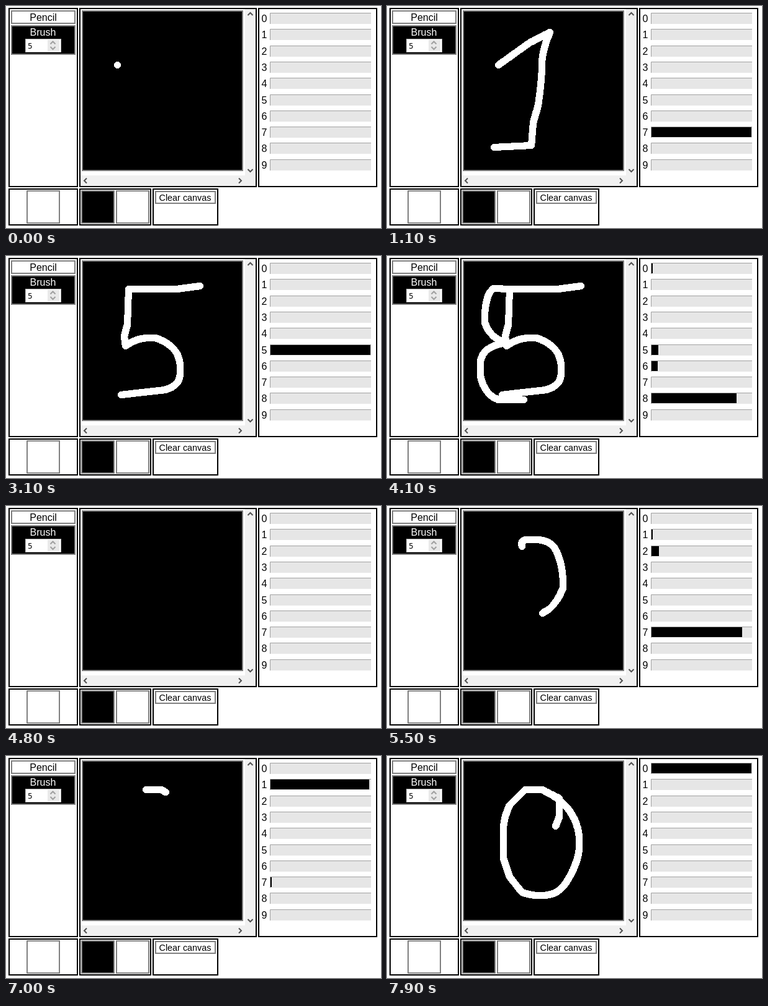
Recreate the animation shown at these times as an HTML page with a canvas. Size 604x359 px, loop 8 s.

```html
<!DOCTYPE html>
<html lang="en">
<head>
<meta charset="utf-8">
<title>Digit recognition</title>
<style>
  html, body { margin: 0; width: 604px; height: 359px; overflow: hidden; background: #fff; }
  body { position: relative; }
  svg, canvas { position: absolute; display: block; }
  svg { left: 0; top: 0; font: 16px "Liberation Sans", Arial, sans-serif; }
  canvas { left: 124px; top: 9px; background: #000; }
  .panel { fill: #fff; stroke: #000; stroke-width: 2; }
  .box { fill: #fff; stroke: #808080; stroke-width: 2; }
  .box.on { fill: #000; }
  .mid { text-anchor: middle; }
  .track { fill: #f0f0f0; }
  .arrow { fill: none; stroke: #505050; stroke-width: 2; }
  .spin { fill: none; stroke: #a0a0a0; stroke-width: 2; }
</style>
</head>
<body>
<svg width="604" height="359">
  <g class="panel">
    <rect x="5" y="4" width="110" height="288"/>
    <rect x="119" y="4" width="284" height="288"/>
    <rect x="407" y="4" width="190" height="288"/>
    <rect x="5" y="296" width="110" height="58"/>
    <rect x="119" y="296" width="114" height="58"/>
    <rect x="237" y="296" width="104" height="58"/>
  </g>

  <rect class="box" x="9" y="8" width="102" height="20"/>
  <text class="mid" x="60" y="24">Pencil</text>
  <rect class="box on" x="9" y="32" width="102" height="46"/>
  <text class="mid" x="59.5" y="48" fill="#fff">Brush</text>
  <rect x="31.5" y="53.5" width="57" height="21" fill="#fff" stroke="#bbb"/>
  <text x="35" y="69" style="font:12px 'DejaVu Sans', sans-serif">5</text>
  <rect x="67" y="55" width="19" height="18" fill="#e9e9e9"/>
  <path class="spin" d="M71.5 61.5l4-4 4 4M71.5 66l4 4 4-4"/>

  <rect class="box on" x="123" y="8" width="258" height="258"/>
  <rect class="track" x="385" y="5" width="17" height="286"/>
  <rect class="track" x="120" y="274" width="282" height="17"/>
  <path class="arrow" d="M389.5 15l4-4 4 4M389.5 264l4 4 4-4M130 278.500l-4 4 4 4M375 278.500l4 4-4 4"/>

  <rect class="box" x="34" y="299" width="52" height="52"/>
  <rect class="box on" x="122" y="299" width="52" height="52"/>
  <rect class="box" x="178" y="299" width="52" height="52"/>
  <rect class="box" x="241" y="300" width="96" height="19"/>
  <text class="mid" x="288.5" y="315" font-size="14.4">Clear canvas</text>
  <g id="meters"></g>
</svg>
<canvas id="pad" width="256" height="256"></canvas>

<script>
const LOOP = 8000, STEP = 100, FULL = 161;

// Per digit: the time of the wipe, pen strokes, and the odds the recogniser reaches.
const digits = [
  { wipe: 1800,
    strokes: [
      { start: 0, end: 800, d: "M179 95L229 59L262 42Q249 72 249 95T243 160L235 188L232 225L172 228" },
      { start: 1100, end: 1400, d: "M232 225L292 223" }],
    reads: [{ at: 600, odds: { 7: 1 } }, { at: 1100, odds: { 7: 1 } }, { at: 1400, odds: { 2: 1 } }] },
  { wipe: 4700,
    strokes: [
      { start: 2028, end: 3100, d: "M312 48L275 53H197L195 110L190 130L192 145Q212 130 240 132Q280 145 280 180V190Q279 210 255 216L185 224" },
      { start: 3310, end: 4100, d: "M197 53L172 52Q160 57 157 92V106Q163 130 190 140Q152 146 150 172V194Q157 225 180 232H220" }],
    reads: [{ at: 2300, odds: { 1: .675, 4: .01, 7: .31 } }, { at: 2900, odds: { 5: 1 } },
      { at: 3400, odds: { 5: 1 } }, { at: 4100, odds: { 0: .01, 5: .07, 6: .063, 8: .853 } }] },
  { wipe: 6700,
    strokes: [
      { start: 5150, end: 5642, d: "M217 65Q214 54 226 54H243Q262 56 270 68Q284 95 283 132Q270 164 251 172L195 223" },
      { start: 5850, end: 6400, d: "M195 223L295 225" }],
    reads: [{ at: 5500, odds: { 1: .013, 2: .077, 7: .905 } }, { at: 6400, odds: { 2: 1 } }] },
  { wipe: LOOP,
    strokes: [
      { start: 6955, end: 7700, d: "M257 58L250 54H222L197 79Q187 100 187 120V165L197 195L217 220Q245 230 270 221Q290 210 304 172Q315 140 304 108Q292 76 257 58L277 68V98L271 113" }],
    reads: [{ at: 7000, odds: { 1: .99, 7: .01 } }, { at: 7700, odds: { 0: 1 } }] }
];

const meters = document.getElementById("meters");
const pen = document.getElementById("pad").getContext("2d");

function make(tag, attrs) {
  const el = document.createElementNS("http://www.w3.org/2000/svg", tag);
  for (const k in attrs) el.setAttribute(k, attrs[k]);
  return el;
}
const add = (tag, attrs) => meters.appendChild(make(tag, attrs));

const fills = Array.from({ length: 10 }, (_, i) => {
  const y = Math.round(11 + 26.3 * i);
  add("text", { x: 411.5, y: y + 15 }).textContent = i;
  add("rect", { x: 425, y, width: FULL + 2, height: 18, fill: "#e6e6e6" });
  add("path", { d: `M425.5 ${y + 18}V${y + .5}H588`, fill: "none", stroke: "#a0a0a0" });
  return add("rect", { x: 426, y: y + 1, width: 0, height: 16 });
});

// Walk each path once, a point per pixel.
for (const { strokes } of digits) for (const s of strokes) {
  const path = make("path", { d: s.d });
  const n = Math.ceil(path.getTotalLength());
  s.points = Array.from({ length: n + 1 }, (_, i) => path.getPointAtLength(i));
}

const clamp = v => Math.max(0, Math.min(1, v));
const smooth = u => u * u * (3 - 2 * u);

// Hard-edged brush tip: a square with its corners cut off.
function stamp(p) {
  const x = Math.round(p.x) - 124, y = Math.round(p.y) - 9;
  for (let dy = -5; dy <= 5; dy++) {
    const w = Math.min(5, 7 - Math.abs(dy));
    pen.fillRect(x - w, y + dy, 2 * w + 1, 1);
  }
}

function drawStroke({ start, end, points }, t) {
  if (t < start) return;
  const last = Math.round(clamp((t - start) / (end - start)) * (points.length - 1));
  points.slice(0, last + 1).forEach(stamp);
}

// Blend between the readings on either side of t.
function oddsAt({ strokes, reads }, t) {
  let prev = { at: strokes[0].start, odds: {} };
  for (const next of reads) {
    if (t < next.at) {
      const u = smooth(clamp((t - prev.at) / (next.at - prev.at)));
      return i => (prev.odds[i] || 0) * (1 - u) + (next.odds[i] || 0) * u;
    }
    prev = next;
  }
  return i => prev.odds[i] || 0;
}

function render(t) {
  pen.fillStyle = "#000";
  pen.fillRect(0, 0, 256, 256);
  pen.fillStyle = "#fff";
  const drawn = digits.find(d => t < d.wipe);
  drawn.strokes.forEach(s => drawStroke(s, t));

  // The meters empty one step after the pad.
  const odds = oddsAt(digits.find(d => t < d.wipe + STEP), t);
  fills.forEach((f, i) => f.setAttribute("width", Math.round(odds(i) * FULL)));
}

let shown = -1;
function tick() {
  const t = Math.floor(performance.now() % LOOP / STEP) * STEP;
  if (t !== shown) render(shown = t);
  requestAnimationFrame(tick);
}
tick();
</script>
</body>
</html>
```
